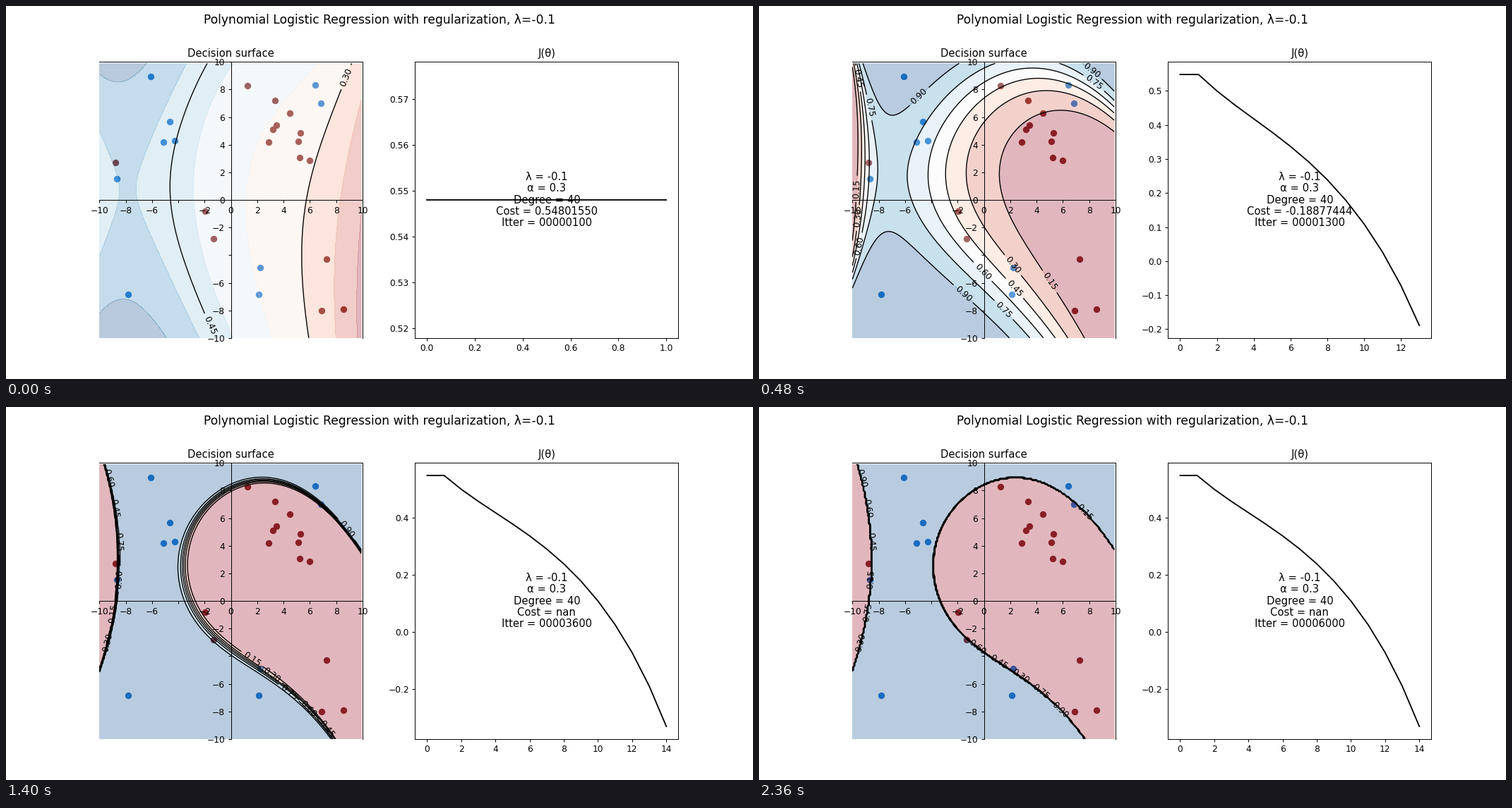
A matplotlib script that plays this animation: 1058 by 529 pixels, repeating every 2.4 s.

```python
import matplotlib.pyplot as plt
import numpy as np
from matplotlib.animation import FuncAnimation
from numpy.polynomial.polynomial import polyval

FRAMES = 60
GROWTH = 1.1222  # weights grow per frame under negative regularization
LAMBDA, ALPHA, DEGREE = -0.1, 0.3, 40

RED = [(1.27, 8.3), (3.37, 7.2), (4.45, 6.3), (3.47, 5.4), (3.2, 5.1), (2.85, 4.2),
       (5.3, 4.85), (5.1, 4.25), (5.2, 3.05), (6, 2.85), (-8.77, 2.7), (-1.97, -0.8),
       (-1.33, -2.8), (7.25, -4.3), (6.9, -8), (8.55, -7.9)]
BLUE = [(-6.1, 8.95), (-4.67, 5.7), (-5.13, 4.2), (-4.25, 4.28), (-8.65, 1.53),
        (6.4, 8.35), (6.85, 7), (2.2, -4.9), (2.1, -6.85), (-7.83, -6.83)]

# The surface forms until FORMED, bends towards its final shape until SETTLED
FORMED, SETTLED, SHARP = 8, 26, 28

axis_values = np.arange(-10, 10, 0.1)
X, Y = np.meshgrid(axis_values, axis_values)


def initial_logit():
    u, v = X / 10, Y / 10
    along = polyval(u, [-0.51, -0.6, 0.25, -0.07, -0.58])
    return along + v ** 2 * (0.2 - 0.12 * u + 0.12 * u ** 2) + u * v * (0.18 + 0.14 * u)


def formed_logit(n):
    """Product of a left parabola and a right blob, scaled by a smooth gain."""
    t = np.clip((n - FORMED) / (SETTLED - FORMED), 0, 1)
    ease = 1 - (1 - t) ** 2
    swell = 3.6 * max(n - SHARP, 0) / (FRAMES - 1 - SHARP)

    def blend(early, late):
        return early + (np.array(late) - early) * ease

    edge, bend = blend([9.2, 0.013], [8.55, 0.0225])
    left = X + edge + bend * (Y - 3) ** 2

    middle = polyval(X, blend([1.25, -0.22, -0.05, 0], [2.35, -0.12, -0.03, -0.0032]))
    half_squared = polyval(X, blend([40, 13, 0.2, 0], [33.2, 6.87, -0.59, 0.028])) + swell
    blob = (Y - middle) ** 2 - half_squared

    a, b, c, d, e = blend([-3.65, -0.165, 0.0075, 0.005, 0.005], [-3.8, -0.1, 0.009, 0.04, 0])
    gain = np.exp(a + b * X + c * X ** 2 + d * Y + e * X * Y)
    return left * blob * gain * GROWTH ** (n - SHARP)


def probability(n):
    t = min(n / FORMED, 1)
    z = (1 - t) * initial_logit() + t * formed_logit(max(n, FORMED))
    return 0.5 * (1 + np.tanh(z / 2))


# Smooth cost curve through a few readings; it overflows to nan afterwards
LAST_COST = 13
cost_curve = np.polyfit([0, 1, 4, 8, 12, LAST_COST],
                        [0.54801550, 0.49968217, 0.37846125,
                         0.17895612, -0.18877444, -0.32958316], 5)


def cost_at(n):
    return np.where(np.asarray(n) <= LAST_COST, np.polyval(cost_curve, n), np.nan)


plt.rcParams["font.family"] = "DejaVu Sans"
fig, (ax, cost_ax) = plt.subplots(1, 2, figsize=(12, 6), dpi=529 / 6)
fig.subplots_adjust(left=0.125, right=0.9, bottom=0.11, top=0.85, wspace=0.2)
fig.suptitle(f"Polynomial Logistic Regression with regularization, λ={LAMBDA}", fontsize=14)

ax.set_title("Decision surface", fontsize=12)
ticks = range(-10, 11, 2)
labels = ["" if v == -4 else str(v).replace("-", "−") for v in ticks]
ax.set_xticks(ticks, labels)
ax.set_yticks(ticks, labels)
for side in ("left", "bottom"):
    ax.spines[side].set_position("zero")
for points, color in ((RED, "#822626"), (BLUE, "#1976d2")):
    ax.scatter(*zip(*points), s=44, color=color)

cost_ax.set_title("J(θ)", fontsize=12)
cost_line, = cost_ax.plot([], [], color="black", lw=1.5)
info = cost_ax.text(0.5, 0.5, "", transform=cost_ax.transAxes, ha="center",
                    va="center", fontsize=12, linespacing=1.12)
layers = []


def draw(n):
    while layers:
        layers.pop().remove()
    p = probability(n)
    layers.append(ax.contourf(X, Y, p, cmap="RdBu", alpha=0.3))
    lines = ax.contour(X, Y, p, levels=np.arange(1, 7) * 0.15, colors="black", linewidths=1.1)
    ax.clabel(lines, fmt="%1.2f", fontsize=10)
    layers.append(lines)
    ax.set(xlim=(-10, 10), ylim=(-10, 10))

    # The first reading is recorded twice
    steps = np.arange(min(n, LAST_COST) + 2)
    cost_line.set_data(steps, cost_at(np.maximum(steps - 1, 0)))
    cost_ax.relim()
    cost_ax.autoscale_view()
    info.set_text(f"λ = {LAMBDA}\nα = {ALPHA}\nDegree = {DEGREE}\n"
                  f"Cost = {float(cost_at(n)):.8f}\nItter = {100 * (n + 1):08d}")


anim = FuncAnimation(fig, draw, frames=FRAMES, interval=40, repeat=True)
plt.show()
```
